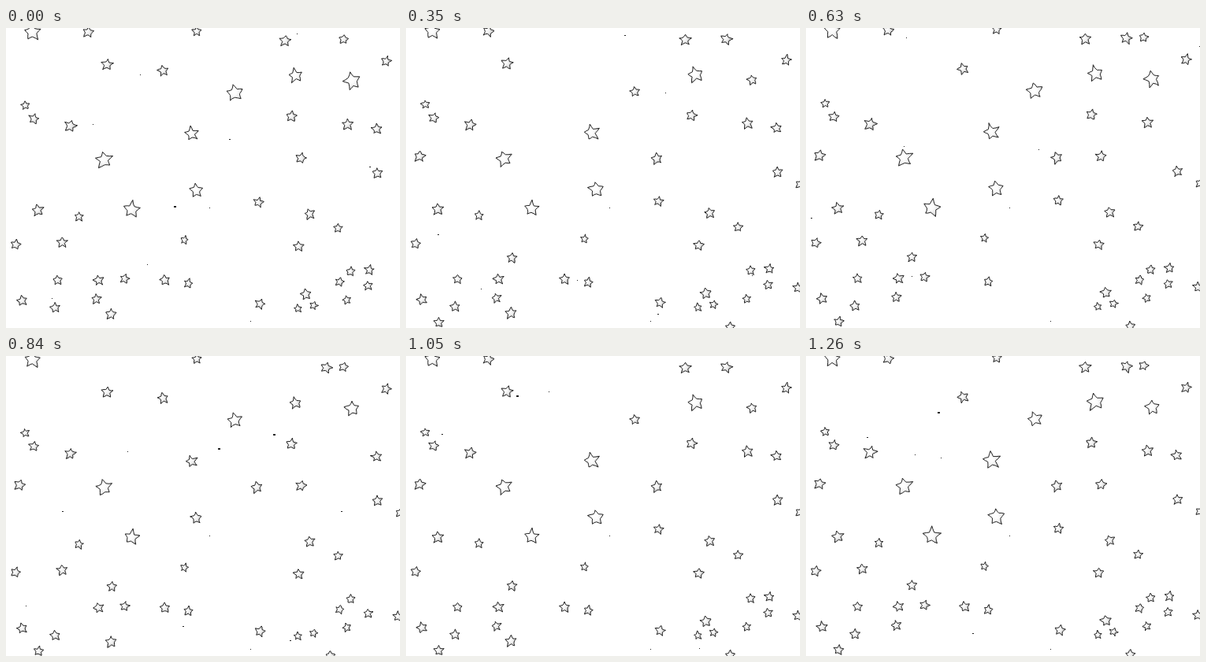
Write an HTML page with a canvas that moves like this. It is 500 by 381 pixels and loops after 1.33 s.

```html
<!DOCTYPE html>
<html lang="en">
<head>
<meta charset="utf-8">
<title>Twinkling stars</title>
<style>
html, body { margin: 0; width: 100%; height: 100%; overflow: hidden; background: #fff; }
canvas { display: block; }
</style>
</head>
<body>
<canvas id="sky" width="500" height="381"></canvas>
<script>
const ctx = document.getElementById('sky').getContext('2d');
const W = 500, H = 381, TAU = Math.PI * 2;
const STEP = 70, STEPS = 19, CYCLE = 10;

// Stars by twinkle: r radius, swell and peak of the pulse, off the dark step; at holds x, y pairs.
const groups = [
  { r: 5.5, at: [226, 269, 390, 352, 432, 345, 370, 356, 24, 98] },
  { r: 6.2, at: [92, 239, 421, 254, 231, 324, 437, 309, 459, 327] },
  { r: 7, at: [35, 115, 362, 112, 385, 236, 12, 275, 371, 277, 117, 320, 20, 346, 62, 355, 482, 42, 471, 184] },
  { r: 6.5, off: 0, at: [500, 199, 497, 331, 134, 293, 411, 381, 41, 375] },
  { r: 7.6, off: 0, at: [17, 164, 318, 167, 406, 15] },
  { r: 6.5, off: 2, at: [65, 320, 114, 344, 461, 307, 320, 221] },
  { r: 7.6, off: 2, at: [104, 5, 354, 16, 433, 122, 40, 231, 380, 338] },
  { r: 6.3, off: 5, at: [242, 4, 428, 14, 150, 318, 423, 322] },
  { r: 7.2, off: 5, at: [374, 165, 71, 272, 199, 54] },
  { r: 7, off: 9, at: [470, 128, 201, 320, 322, 350] },
  { r: 7.9, off: 8.5, at: [128, 46, 133, 363] },
  { r: 7.9, swell: .7, peak: 8, at: [81, 124] },
  { r: 10.2, swell: 1, peak: 8.5, at: [159, 230] },
  { r: 11, swell: .6, peak: 9, at: [33, 5, 124, 167] },
  { r: 9.3, swell: 2.4, peak: 0, at: [439, 67, 290, 82] },
  { r: 9.8, swell: 2, peak: 7, at: [367, 60, 235, 134, 241, 206] }
];

function random(seed) {
  let s = Math.imul(seed + 1, 7919);
  return () => {
    s = (s + 0x6D2B79F5) | 0;
    let t = Math.imul(s ^ (s >>> 15), 1 | s);
    t ^= t + Math.imul(t ^ (t >>> 7), 61 | t);
    return ((t ^ (t >>> 14)) >>> 0) / 4294967296;
  };
}

function radius({ r, swell = 0, peak = 0, off }, phase) {
  const gap = Math.abs(phase - off);
  if (Math.min(gap, CYCLE - gap) < 1) return 0;
  return r + swell * Math.cos(TAU * (phase - peak) / CYCLE);
}

function shade(x, y, r) {
  const small = r < 8.5;
  const g = ctx.createRadialGradient(x - r * .25, y - r * .2, 0, x, y, r);
  g.addColorStop(0, '#fff');
  g.addColorStop(.4, small ? '#f0f0f0' : '#fcfcfc');
  g.addColorStop(.8, small ? '#c8c8c8' : '#e4e4e4');
  g.addColorStop(1, '#aaa');
  return g;
}

// Five uneven arms; every side has a slightly bent midpoint, as if drawn by hand.
function star(x, y, r, id, phase) {
  const own = random(id), now = random(id * 31 + phase + 500);
  const jitter = (a, b) => (own() - .5) * a + (now() - .5) * b;
  const turn = jitter(.5, .2) - TAU / 4;
  const corners = Array.from({ length: 10 }, (_, i) => {
    const len = r * (i % 2 ? .5 + jitter(.1, .06) : 1 + jitter(.22, .14));
    const a = turn + i * TAU / 10 + jitter(.12, .1);
    return [x + len * Math.cos(a), y + len * Math.sin(a)];
  });
  ctx.beginPath();
  corners.forEach(([ax, ay], i) => {
    const [bx, by] = corners[(i + 1) % 10];
    ctx.lineTo(ax, ay);
    ctx.lineTo((ax + bx) / 2 + jitter(.5, .7), (ay + by) / 2 + jitter(.5, .7));
  });
  ctx.closePath();
  ctx.fillStyle = shade(x, y, r);
  ctx.fill();
  ctx.stroke();
}

function speck(x, y, size) {
  ctx.fillStyle = '#222';
  ctx.fillRect(Math.round(x), Math.round(y), size, Math.ceil(size / 2));
}

function specks(step) {
  const rnd = random(step + 900);
  const count = 2 + rnd() * 8;
  for (let i = 0; i < count; i++) speck(rnd() * W, rnd() * H, 1 + Math.floor(rnd() * 2.3));
  speck(258, 228, 1);
  speck(310, 372, 1);
}

function draw(step) {
  const phase = step % CYCLE, rise = phase * .26;
  ctx.fillStyle = '#fff';
  ctx.fillRect(0, 0, W, H);
  ctx.strokeStyle = '#222';
  ctx.lineWidth = 1;
  ctx.lineJoin = 'round';
  let id = 0;
  for (const group of groups) {
    const r = radius(group, phase);
    for (let i = 0; i < group.at.length; i += 2) {
      id++;
      if (r) star(group.at[i] + .4, group.at[i + 1] + .4 - rise, r, id, phase);
    }
  }
  specks(step);
}

let shown = -1;
const start = performance.now();
function tick() {
  const step = Math.floor((performance.now() - start) / STEP) % STEPS;
  if (step !== shown) draw(shown = step);
  requestAnimationFrame(tick);
}
tick();
</script>
</body>
</html>
```
